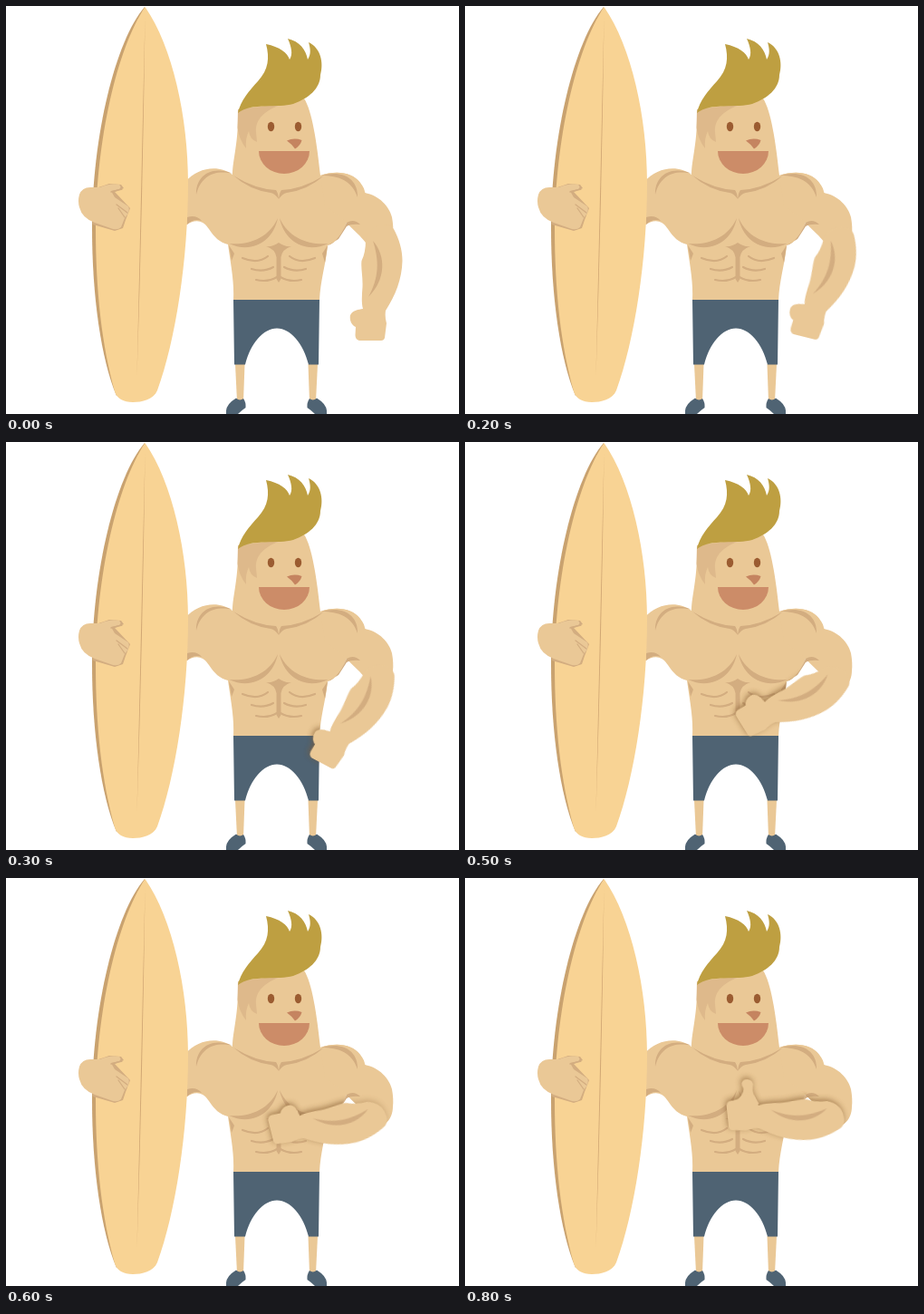
These frames come from a looping animation (500x450 px, 0.9 s). An HTML page:

```html
<!DOCTYPE html>
<html lang="en">
<head>
<meta charset="utf-8">
<title>Surfer thumbs up</title>
<style>
  html, body { margin: 0; width: 100%; height: 100%; overflow: hidden; background: #fff; }
  svg { display: block; width: 500px; height: 450px; }
  .skin { fill: #eac896; }
  .shade { fill: #d3ad80; }
  .crease { fill: none; stroke: #d3ad80; stroke-width: 2.2; stroke-linecap: round; }
  .cloth { fill: #4f6373; }
  .swing { transform-origin: 405px 253.5px; }
  .cast { fill: #80562a; }
</style>
</head>
<body>
<svg viewBox="0 0 500 450">
  <defs>
    <path id="torso" d="M198 194C212 177 236 175 250 186C250 170 257 150 256 114L329 102C338 116 343 150 347 187C364 181 382 183 391 195L397 207L376 239C371 250 365 262 355 264C353 285 347 302 346 325H251C252 306 249 290 245 263C236 261 230 255 224 246C217 235 208 235 198 242Z"/>
    <path id="upperArm" d="M347 187C364 181 382 183 391 195Q396 201 396 206C412 209 423 221 426 233Q428 244 427 252C427 266 418 275 406 275C399 275 398 268 397 261C392 254 384 248 376 239L352 220Z"/>
    <path id="shorts" d="M251 324H346L345 395.500H334C328 372 314 355.500 299 355.500C284 355.500 270 372 264 395.500H252Z"/>
    <path id="forearm" d="M397 258C400 248 407 242 415 241.500Q424 240 428 246C434 257 437.500 269 437.500 281C437 301 430 319 419 336Q418 343 420 350L418 366Q417 369.500 413 369H390Q385.500 368 385.500 363L386 354C381 352 379 346 380 341C383 335 389 335 394 334C392 326 393 318 393.500 310C394 298 391.500 289 392.500 281Q397 272 397 258Z"/>
    <path id="thumb" d="M390 363L385.500 360Q385 354 380 351Q375 347 371 349.500C366 351 363 347 364 343C365 338 369 336 373 338Q381 340 392 333L397 350Z"/>
    <clipPath id="bodyClip"><use href="#torso"/><use href="#shorts"/></clipPath>
    <clipPath id="armClip"><use href="#upperArm"/></clipPath>
    <filter id="soft" x="-30%" y="-30%" width="160%" height="160%"><feGaussianBlur stdDeviation="3"/></filter>
    <g id="halfTorso">
      <path class="shade" d="M246 262C268 264 290 256 300 234C295 259 272 274 246 262Z"/>
      <path class="shade" d="M251 187Q275 202 298 203Q300 205 301 213Q297 207 292 206Q269 203 251 187Z"/>
      <path class="crease" d="M261 278Q278 285 289 276M271 290Q284 294 295 288M276 302Q289 305 299 299"/>
      <path class="shade" d="M301 261Q294 266 287 265Q297 268 298.500 277V301L301 305Z"/>
    </g>
  </defs>

  <!-- legs and shoes -->
  <g id="leg">
    <path class="skin" d="M253 395H263.500L262 436H255Z"/>
    <path class="cloth" d="M243 450Q242 442 249 436L254 432.500Q258 436 262 433Q265 437 264.500 443Q260 446 256 450Z"/>
  </g>
  <use href="#leg" transform="matrix(-1 0 0 1 597 0)"/>

  <!-- body -->
  <use href="#torso" class="skin"/>
  <use href="#upperArm" class="skin"/>
  <use href="#halfTorso"/>
  <use href="#halfTorso" transform="matrix(-1 0 0 1 602 0)"/>
  <path class="shade" d="M210 208C209 190 224 174 251 185C231 180 215 187 210 208Z"/>
  <path class="shade" d="M348 187C372 180 389 191 388 211C382 193 368 187 348 187Z"/>
  <path class="shade" d="M355 264Q366 261 376 239Q384 234 391 241Q381 240 376 243L367 257Z"/>
  <path class="shade" d="M246 264L252 273L249 281Z"/>
  <path class="shade" d="M355 264L349 273L352 283Z"/>
  <path class="shade" d="M200 233Q210 230 216 237Q207 234 200 241Z"/>
  <use href="#shorts" class="cloth"/>

  <!-- head -->
  <path fill="#deb98b" d="M256 114L306 108C285 115 275 125 276 139L277 150Q269 147 268 138Q264 146 265 157Q257 147 255.500 134Z"/>
  <path fill="#be9f41" d="M256 118C259 104 268 94 278 83C290 70 291 57 287 42C302 45 311 52 313 59C317 53 315 45 311 36C324 39 331 48 333 59C337 53 336 47 334 40C347 46 351 62 347 76C347 91 334 102 317 108C300 113 272 106 256 118Z"/>
  <ellipse cx="292.500" cy="133" rx="3.700" ry="5.300" fill="#9b5c31"/>
  <ellipse cx="322.500" cy="133" rx="3.700" ry="5.300" fill="#9b5c31"/>
  <path fill="#c58460" d="M310 148.500Q318 145 326.500 148Q325 154 319 157.500Q315 152 310 148.500Z"/>
  <path fill="#cc8c68" d="M279 160H335A28 25 0 0 1 279 160Z"/>

  <!-- surfboard and the hand around it -->
  <path fill="#c9a26f" d="M153 1C121 38 95 143 95 245C95 320 105 390 122 430L150 400Z"/>
  <path fill="#f8d394" d="M153.500 1C184 45 201 123 201 195C201 280 187 370 167 424C163 434 150 437 140 437C130 437 122 433 120 425C106 375 99 315 99 245C100 148 122 48 153.500 1Z"/>
  <path fill="#d0a673" d="M153.500 12Q151 210 144.500 410Q149 210 153.500 12Z"/>
  <path class="shade" d="M96 202L114 196L127 197L130 201L120 205L137 223L132 236L129 245L120 248L96 241Z"/>
  <path class="skin" d="M81 208Q84 200 93 200L104 200Q114 195 125 197Q128 200 125 202L116 204L120 211L135 221Q137 225 134 230L131 234L127 244Q124 247 118 246L98 239Q84 234 81 222Q79 215 81 208Z"/>
  <path class="crease" style="stroke-width:1.300" d="M116 205L128 202M122 219L134 228M124 223L131 233"/>

  <!-- forearm and its shadow -->
  <g clip-path="url(#bodyClip)">
    <g filter="url(#soft)" transform="translate(-1 -2)" opacity=".65">
      <g class="swing cast"><use href="#thumb" class="thumb"/><use href="#forearm"/></g>
    </g>
  </g>
  <g clip-path="url(#armClip)" class="armShadow">
    <g filter="url(#soft)" transform="translate(-1 -2)">
      <g class="swing cast"><use href="#forearm"/></g>
    </g>
  </g>
  <g class="swing">
    <g class="skin"><use href="#thumb" class="thumb"/><use href="#forearm"/></g>
    <path class="shade" d="M405 259C420 276 419 302 400 321C412 299 412 281 405 259Z"/>
  </g>
</svg>
<script>
  const STEP = 100;
  const angles = [0, 7, 14, 28, 41, 58, 76, 81, 84];
  const thumbHidden = [22, 22, 22, 22, 22, 22, 22, 10, 0];
  const armShadow = [0, 0, 0, 0, 0, 0, .3, .5, .65];

  // Holds each table value for one step, then jumps to the next.
  function play(selector, values, toStyle) {
    const frames = [...values, values[0]].map((value, i) => ({
      ...toStyle(value), offset: i / values.length, easing: 'steps(1, end)'
    }));
    for (const el of document.querySelectorAll(selector)) {
      el.animate(frames, { duration: STEP * values.length, iterations: Infinity }).startTime = 0;
    }
  }

  play('.swing', angles, a => ({ transform: `rotate(${a}deg)` }));
  play('.thumb', thumbHidden, x => ({ transform: `translate(${x}px, 0px)` }));
  play('.armShadow', armShadow, opacity => ({ opacity }));
</script>
</body>
</html>
```
